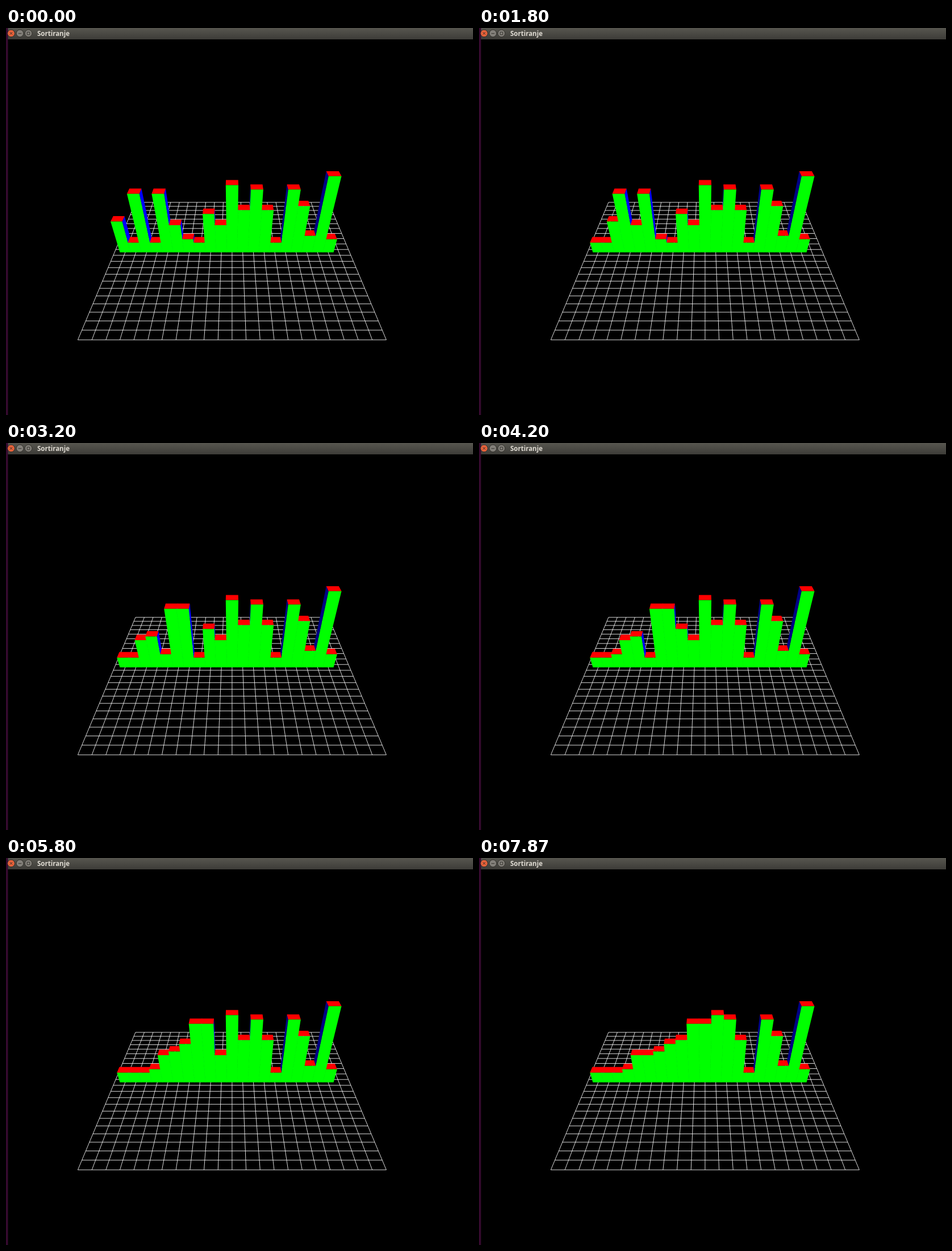
Recreate the animation shown at these times as an HTML page. Size 822 by 681 pixels, loop 8000 ms.

```html
<!DOCTYPE html>
<html lang="sr">
<head>
<meta charset="utf-8">
<title>Sortiranje</title>
<style>
  html, body { margin: 0; width: 100%; height: 100%; overflow: hidden; background: #000; }
  svg { display: block; width: 100vw; height: 100vh; }
  .title { font: bold 11.5px "Open Sans", "Noto Sans", sans-serif; fill: #dfdbd2; }
</style>
</head>
<body>
<svg viewBox="0 0 822 681" xmlns="http://www.w3.org/2000/svg">
  <defs>
    <linearGradient id="bar" x1="0" y1="0" x2="0" y2="1">
      <stop offset="0" stop-color="#57564f"/>
      <stop offset="1" stop-color="#3d3c38"/>
    </linearGradient>
  </defs>
  <rect width="822" height="681"/>
  <rect width="822" height="20" fill="url(#bar)"/>
  <rect width="3.5" height="681" fill="#360a2f"/>
  <g stroke="#33312c" stroke-width="1" transform="translate(0 .4)">
    <circle cx="9" cy="9" r="6.3" fill="#e8623a"/>
    <circle cx="24.5" cy="9" r="6.3" fill="#83807a"/>
    <circle cx="39.5" cy="9" r="6.3" fill="#83807a"/>
    <path d="M6.8 6.8l4.4 4.4m0-4.4l-4.4 4.4M21.7 9.3h5.6M37.2 6.8h4.6v4.6h-4.6z" fill="none"/>
  </g>
  <text class="title" x="55" y="13.8">Sortiranje</text>
  <path id="grid" fill="none" stroke="#fff" stroke-width=".85"/>
  <g id="bars"></g>
</svg>
<script>
const LOOP = 8000, FPS = 15, FIRST = 900, STEP = 300;
const HALF = 11;
const START = [9, 3, 16, 3, 16, 8, 4, 3, 11, 8, 18, 12, 17, 12, 3, 17, 13, 5, 20, 4];
const BACK = -1.5, FRONT = -0.5;
const RED = '#f00', GREEN = '#0f0', BLUE = '#00f', NAVY = '#000084';

// Perspective view: x to the right, h up, z towards the viewer
function project(x, h, z) {
  const ground = 0.052622 - 0.0011003 * z, lift = 0.000452 * h;
  const w = ground - lift;
  const y = (26.22 - 98 * ground - 1050 * lift) / w - 0.3;
  return (397.9 + x / w).toFixed(2) + ' ' + y.toFixed(2);
}

const line = (...points) => 'M' + points.map(p => project(...p)).join('L');
const face = (color, ...points) => `<path fill="${color}" d="${line(...points)}Z"/>`;
const seam = (color, ...points) => `<path stroke="${color}" d="${line(...points)}"/>`;

function drawGrid() {
  let d = '';
  for (let i = -HALF; i <= HALF; i++) {
    d += line([i, 0, -HALF], [i, 0, HALF]) + line([-HALF, 0, i], [HALF, 0, i]);
  }
  document.getElementById('grid').setAttribute('d', d);
}

// Insertion sort, recording the left index of every swap
function findSwaps(values) {
  const a = values.slice(), swaps = [];
  for (let i = 1; i < a.length; i++) {
    for (let j = i; j > 0 && a[j - 1] > a[j]; j--) {
      [a[j - 1], a[j]] = [a[j], a[j - 1]];
      swaps.push(j - 1);
    }
  }
  return swaps;
}

function drawBar(i, h) {
  const left = i - 10.5, right = left + 1;
  const side = i < 10 ? right : left;
  return (i === 10 ? '' : face(i < 10 ? BLUE : NAVY,
      [side, 0, FRONT], [side, h, FRONT], [side, h, BACK], [side, 0, BACK])) +
    face(RED, [left, h, FRONT], [right, h, FRONT], [right, h, BACK], [left, h, BACK]) +
    face(GREEN, [left, 0, FRONT], [right, 0, FRONT], [right, h, FRONT], [left, h, FRONT]);
}

// Closes the hairline gap between neighbouring faces
function drawSeam(i, h, next) {
  const x = i - 9.5;
  return (h === next ? seam(RED, [x, h, FRONT], [x, h, BACK]) : '') +
    seam(GREEN, [x, 0, FRONT], [x, Math.min(h, next), FRONT]);
}

const swaps = findSwaps(START);
// Outer bars first, so that inner ones cover their sides
const order = START.map((_, i) => i).sort((a, b) => Math.abs(b - 10) - Math.abs(a - 10));
const bars = document.getElementById('bars');
let shown = -1;

function render(ms) {
  const tick = Math.floor((ms % LOOP + 4) * FPS / 1000);
  const time = tick * 1000 / FPS + 0.01;
  const count = Math.max(0, Math.floor((time - FIRST) / STEP) + 1);
  if (count === shown) return;
  shown = count;
  const a = START.slice();
  for (const j of swaps.slice(0, count)) [a[j], a[j + 1]] = [a[j + 1], a[j]];
  bars.innerHTML = order.map(i => drawBar(i, a[i])).join('') +
    a.slice(1).map((next, i) => drawSeam(i, a[i], next)).join('');
}

drawGrid();
render(0);
const begin = performance.now();
(function loop() {
  render(performance.now() - begin);
  requestAnimationFrame(loop);
})();
</script>
</body>
</html>
```
